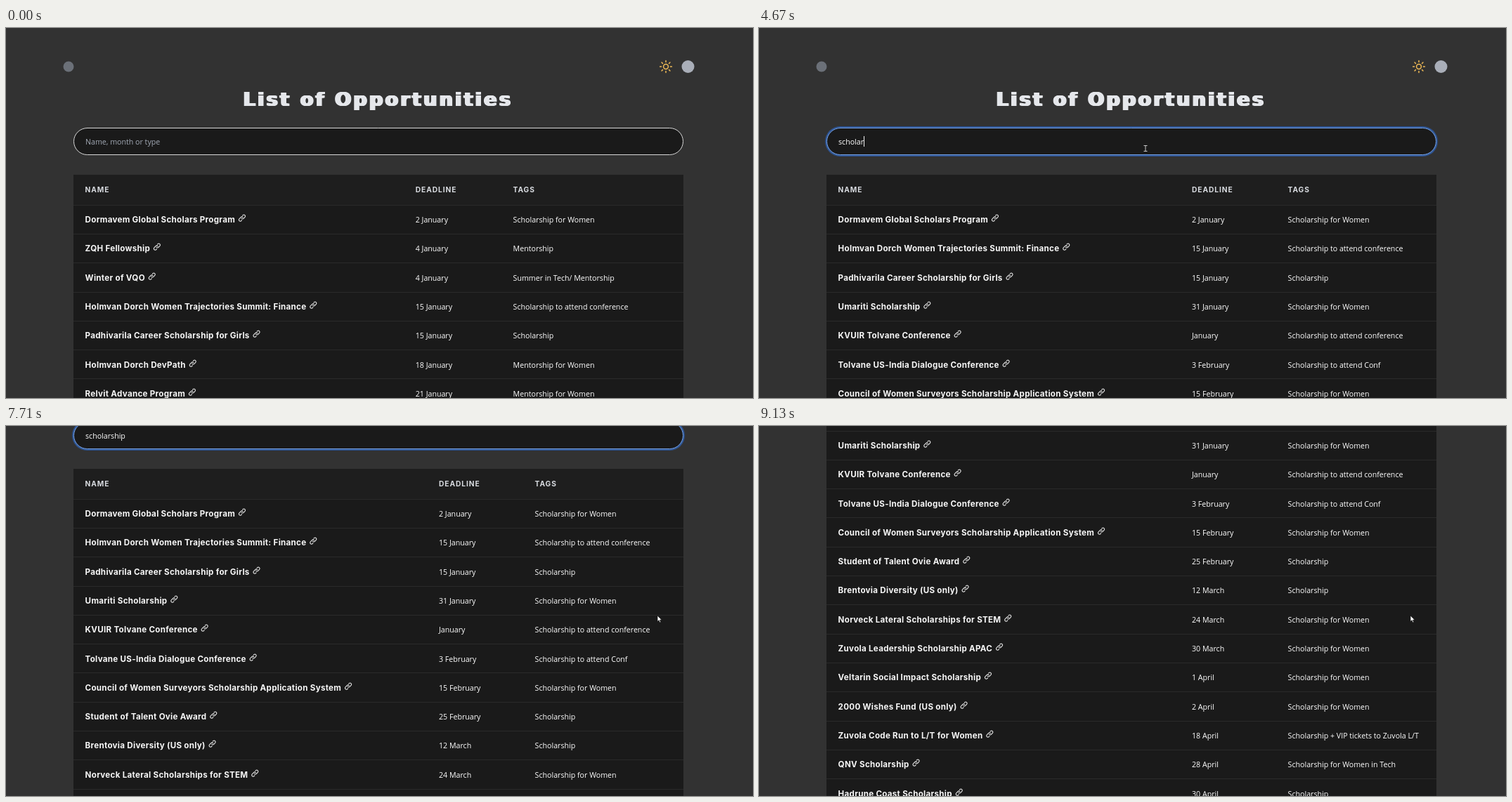
Recreate the animation shown at these times as an HTML page with a canvas. Size 1063 px wide and 527 px high, loop 9260 ms.

```html
<!DOCTYPE html>
<html lang="en">
<head>
<meta charset="utf-8">
<title>List of Opportunities</title>
<style>
  html, body { margin: 0; width: 100%; height: 100%; overflow: hidden; background: #323232; }
  canvas { display: block; }
</style>
</head>
<body>
<canvas id="stage" width="1063" height="527"></canvas>
<script>
const ctx = document.getElementById('stage').getContext('2d');
const W = 1063, H = 527, LOOP = 9260;
const LEFT = 96, RIGHT = 964, PITCH = 41.3;

const BODY = '10.65px "Open Sans", "Noto Sans", sans-serif';
const BOLD = '700 11.6px Inter, sans-serif';
const HEAD = '700 10.2px Inter, sans-serif';
const TITLE = '700 27px "DejaVu Sans", sans-serif';

const WOMEN = 'Scholarship for Women', CONF = 'Scholarship to attend conference';
const global = ['Dormavem Global Scholars Program', '2 January', WOMEN];
const summit = ['Holmvan Dorch Women Trajectories Summit: Finance', '15 January', CONF];
const career = ['Padhivarila Career Scholarship for Girls', '15 January', 'Scholarship'];

const allRows = [
  global,
  ['ZQH Fellowship', '4 January', 'Mentorship'],
  ['Winter of VQO', '4 January', 'Summer in Tech/ Mentorship'],
  summit,
  career,
  ['Holmvan Dorch DevPath', '18 January', 'Mentorship for Women'],
  ['Relvit Advance Program', '21 January', 'Mentorship for Women']
];
const foundRows = [
  global,
  summit,
  career,
  ['Umariti Scholarship', '31 January', WOMEN],
  ['KVUIR Tolvane Conference', 'January', CONF],
  ['Tolvane US-India Dialogue Conference', '3 February', 'Scholarship to attend Conf'],
  ['Council of Women Surveyors Scholarship Application System', '15 February', WOMEN],
  ['Student of Talent Ovie Award', '25 February', 'Scholarship'],
  ['Brentovia Diversity (US only)', '12 March', 'Scholarship'],
  ['Norveck Lateral Scholarships for STEM', '24 March', WOMEN],
  ['Zuvola Leadership Scholarship APAC', '30 March', WOMEN],
  ['Veltarin Social Impact Scholarship', '1 April', WOMEN],
  ['2000 Wishes Fund (US only)', '2 April', WOMEN],
  ['Zuvola Code Run to L/T for Women', '18 April', 'Scholarship + VIP tickets to Zuvola L/T'],
  ['QNV Scholarship', '28 April', 'Scholarship for Women in Tech'],
  ['Hadrune Coast Scholarship', '30 April', 'Scholarship']
];

const CLICK = 1880, BLINK = 530;
const WORD = 'scholarship';
const keyTimes = [2670, 2940, 3080, 3540, 4070, 4400, 4670, 5270, 5470, 5570, 5670];

// time, x, y
const path = [
  [520, 1050, 516], [650, 1050, 516], [720, 880, 370], [790, 700, 245], [860, 623, 196],
  [1060, 623, 196], [1550, 550, 171.5], [6410, 550, 171.5], [6480, 590, 153],
  [6550, 655, 162], [6620, 780, 215], [6690, 890, 260], [6760, 927, 270]
];

// start, end of each wheel notch; the page scrolls in steps of STEP ms
const NOTCH = 73.8, STEP = 67.5;
const notches = [[7090, 7360], [7380, 7650], [7670, 7980], [8032, 8242], [8580, 9130]];

const link = new Path2D('M13.8 10.2a4 4 0 0 0-5.6 0l-4 4a4 4 0 1 0 5.6 5.6l1.1-1.1' +
  'm-.8-4.9a4 4 0 0 0 5.7 0l4-4a4 4 0 0 0-5.7-5.6l-1.1 1.1');
const arrow = new Path2D('M0 0V8.6L2 6.8L3.4 9.9L4.8 9.2L3.5 6.3H6.2Z');

const clamp = v => Math.max(0, Math.min(1, v));
const ease = p => p < 0.5 ? 4 * p ** 3 : 1 - 4 * (1 - p) ** 3;

function scrollAt(t) {
  const held = Math.floor((t - 2) / STEP) * STEP + 2;
  return Math.round(notches.reduce((sum, [a, b]) => sum + NOTCH * ease(clamp((held - a) / (b - a))), 0));
}

function pointerAt(t) {
  let i = path.length - 1;
  while (path[i][0] > t) i--;
  const a = path[i], b = path[i + 1] || a;
  const p = b === a ? 0 : (t - a[0]) / (b[0] - a[0]);
  return [a[1] + (b[1] - a[1]) * p, a[2] + (b[2] - a[2]) * p];
}

function text(str, x, y, font, color, spacing = 0) {
  ctx.font = font;
  ctx.letterSpacing = spacing + 'px';
  ctx.fillStyle = color;
  ctx.fillText(str, x, y);
  return ctx.measureText(str).width;
}

function disc(x, y, r, color) {
  ctx.fillStyle = color;
  ctx.beginPath();
  ctx.arc(x, y, r, 0, 7);
  ctx.fill();
}

function pill(grow) {
  ctx.beginPath();
  ctx.roundRect(LEFT + 0.5 - grow, 142.5 - grow, RIGHT - LEFT - 1 + 2 * grow, 38 + 2 * grow, 19 + grow);
}

function drawSun(x, y) {
  ctx.strokeStyle = '#f0bb57';
  ctx.lineWidth = 1.5;
  ctx.lineCap = 'round';
  ctx.beginPath();
  ctx.arc(x, y, 3.4, 0, 7);
  for (let i = 0; i < 8; i++) {
    const c = Math.cos(i * Math.PI / 4), s = Math.sin(i * Math.PI / 4);
    ctx.moveTo(x + c * 6.4, y + s * 6.4);
    ctx.lineTo(x + c * 8.4, y + s * 8.4);
  }
  ctx.stroke();
}

function drawTop() {
  disc(89, 55, 7.5, '#6b7078');
  disc(970.5, 55, 9, '#a9aeb8');
  drawSun(939, 55);
  // overprint sideways for heavy upright strokes
  for (let dx = 0; dx < 3; dx += 0.7) {
    text('List of Opportunities', 336.3 + dx, 110.5, TITLE, '#e5e7eb', 3.25);
  }
}

function drawSearch(t) {
  const focus = t >= CLICK;
  const typed = WORD.slice(0, keyTimes.filter(k => k <= t).length);
  if (focus) {
    pill(2.4);
    ctx.fillStyle = '#2f5593';
    ctx.fill();
  }
  pill(0);
  ctx.fillStyle = '#1a1a1a';
  ctx.fill();
  ctx.strokeStyle = focus ? '#78a5ea' : '#d8d8d8';
  ctx.lineWidth = 1;
  ctx.stroke();

  let end = 113;
  if (typed) end += text(typed, 113, 166, BODY, '#ffffff');
  else text('Name, month or type', 113, 166, BODY, '#a3aab6');

  const last = typed ? keyTimes[typed.length - 1] : CLICK;
  if (focus && Math.floor((t - last) / BLINK) % 2 === 0) {
    ctx.fillStyle = '#f4f4f4';
    ctx.fillRect(Math.round(end), 154, 1, 15);
  }
}

function drawLink(x, y) {
  ctx.save();
  ctx.translate(x, y);
  ctx.scale(0.5, 0.5);
  ctx.translate(-12, -12);
  ctx.strokeStyle = '#f0f0f0';
  ctx.lineWidth = 2.1;
  ctx.lineCap = ctx.lineJoin = 'round';
  ctx.stroke(link);
  ctx.restore();
}

function drawTable(t) {
  const rows = t < keyTimes[1] ? allRows : foundRows;
  const [dateX, tagX] = t < keyTimes[2] ? [582.7, 721.6] : [616, 752.6];
  ctx.fillStyle = '#1a1a1a';
  ctx.fillRect(LEFT, 209, RIGHT - LEFT, 800);
  ctx.fillStyle = '#1e1e1e';
  ctx.fillRect(LEFT, 209, RIGHT - LEFT, 43);

  [['NAME', 112.6], ['DEADLINE', dateX], ['TAGS', tagX]]
    .forEach(([label, x]) => text(label, x, 234, HEAD, '#d9dce1', 0.95));

  rows.forEach(([name, date, tag], i) => {
    const y = Math.round(273 + i * PITCH);
    ctx.fillStyle = '#2a2a2a';
    ctx.fillRect(LEFT, Math.round(251.6 + i * PITCH), RIGHT - LEFT, 1);
    const width = text(name, 112.6, y + 4, BOLD, '#f7f7f7', 0.29);
    drawLink(112.6 + width + 10, y - 2.5);
    text(date, dateX, y + 4, BODY, '#ffffff');
    text(tag, tagX, y + 4, BODY, '#ffffff');
  });
}

function drawPointer(t) {
  if (t < path[0][0]) return;
  const [x, y] = pointerAt(t);
  if (t >= CLICK && t < CLICK + 200) disc(548.7, 171, 8.5, '#88850c');
  const overField = x > LEFT && x < RIGHT && y > 143 && y < 181;
  ctx.save();
  ctx.translate(x, y);
  if (overField) {
    ctx.fillStyle = '#c8c8c8';
    ctx.fillRect(-0.5, -4, 1, 8);
    ctx.fillRect(-2.5, -4.5, 5, 1);
    ctx.fillRect(-2.5, 3.5, 5, 1);
  } else {
    ctx.fillStyle = '#ffffff';
    ctx.strokeStyle = '#111111';
    ctx.lineWidth = 0.7;
    ctx.lineJoin = 'miter';
    ctx.fill(arrow);
    ctx.stroke(arrow);
  }
  ctx.restore();
}

function draw(t) {
  ctx.fillStyle = '#323232';
  ctx.fillRect(0, 0, W, H);
  ctx.save();
  ctx.translate(0, -scrollAt(t));
  drawTop();
  drawSearch(t);
  drawTable(t);
  ctx.restore();
  drawPointer(t);
}

const start = performance.now();
function tick() {
  draw((performance.now() - start) % LOOP);
  requestAnimationFrame(tick);
}
tick();
</script>
</body>
</html>
```
